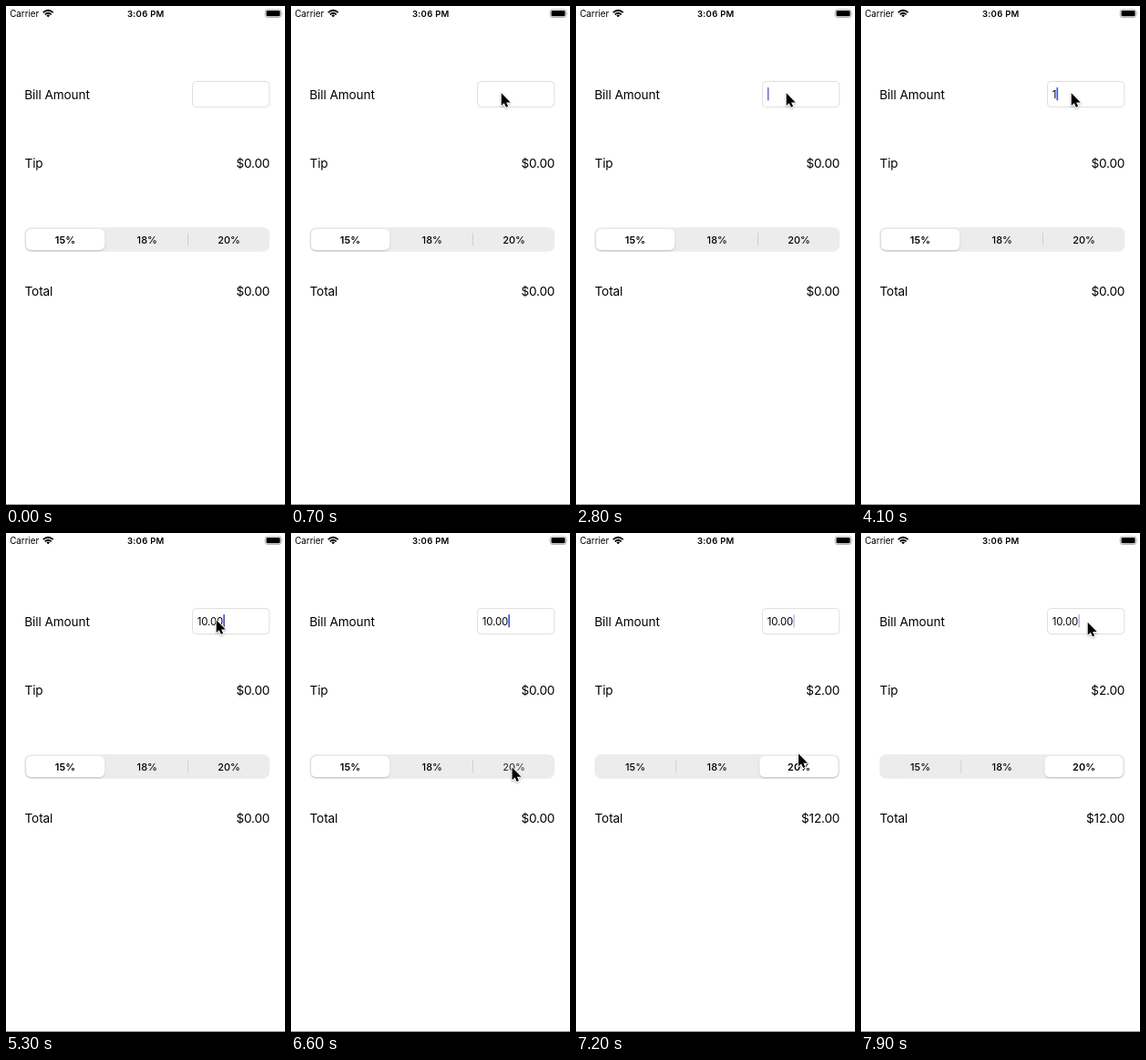
These frames come from a looping animation (306 px wide and 546 px high, 8000 ms). An HTML page:

```html
<!DOCTYPE html>
<html lang="en">
<head>
<meta charset="utf-8">
<title>Tip calculator</title>
<style>
  html, body { margin: 0; width: 100%; height: 100%; overflow: hidden; background: #fff; }
  svg { display: block; width: 100%; height: 100%; font-family: Inter, Roboto, sans-serif; }
  .label { font-size: 13.6px; letter-spacing: -.1px; }
  .money { font-size: 13.6px; letter-spacing: -.18px; text-anchor: end; }
  .status { font-size: 9.8px; }
  .clock { font-size: 9.5px; font-weight: 600; letter-spacing: .26px; text-anchor: middle; }
  .segment { font-size: 10.9px; font-weight: 500; letter-spacing: .06px; text-anchor: middle; }
</style>
</head>
<body>
<svg viewBox="0 0 306 546" xmlns="http://www.w3.org/2000/svg">
  <defs>
    <filter id="thumbShadow" x="-10%" y="-30%" width="120%" height="170%">
      <feDropShadow dx="0" dy="1" stdDeviation="1.2" flood-opacity=".2"/>
    </filter>
    <filter id="arrowShadow" x="-50%" y="-30%" width="200%" height="180%">
      <feDropShadow dx="0" dy="1" stdDeviation=".9" flood-opacity=".35"/>
    </filter>
  </defs>
  <rect width="306" height="546" fill="#fff"/>

  <text class="status" x="4.2" y="12">Carrier</text>
  <text class="clock" x="153.3" y="11.9">3:06 PM</text>
  <g fill="none" stroke="#000" stroke-width="1.7">
    <path d="M40.7 7.2Q46.2 2.3 51.7 7.2"/>
    <path d="M42.7 9.3Q46.2 6.2 49.7 9.3"/>
    <path d="M44.3 10.4Q46.2 8.8 48.1 10.4L46.2 12.3Z" fill="#000" stroke="none"/>
  </g>
  <rect x="284.2" y="3.9" width="17.6" height="8.6" rx="2.4" fill="none" stroke="#a0a0a0" stroke-width=".8"/>
  <rect x="285.5" y="5.1" width="15.1" height="6.2" rx="1.3"/>
  <path d="M302.7 6.8Q304.2 8.2 302.7 9.6Z" fill="#a0a0a0"/>

  <text class="label" x="20.3" y="102">Bill Amount</text>
  <text class="label" x="20.5" y="177">Tip</text>
  <text class="label" x="20.5" y="317">Total</text>
  <text class="money" id="tip" x="289.2" y="177"></text>
  <text class="money" id="total" x="289.2" y="317"></text>

  <rect x="204.5" y="82.5" width="84.3" height="28" rx="4" fill="#fff" stroke="#dfdfdf"/>
  <text id="amount" x="209.7" y="101" font-size="11.4" letter-spacing="-.1"></text>
  <rect id="caret" y="89" width="1.7" height="14.6" rx=".8" fill="#4359dc"/>

  <rect x="20.4" y="242.3" width="268.8" height="26.4" rx="7" fill="#ececec"/>
  <path id="dividerLeft" d="M109.8 248.5v14" stroke="#d0d0d2"/>
  <path id="dividerRight" d="M199.5 248.5v14" stroke="#d0d0d2"/>
  <rect id="thumb" y="244" width="86" height="23" rx="5.6" fill="#fff" filter="url(#thumbShadow)"/>
  <text id="first" class="segment" x="65" y="259.6">15%</text>
  <text class="segment" x="154.8" y="259.6">18%</text>
  <text id="last" class="segment" x="244.6" y="259.6">20%</text>

  <path d="M0 545.5H306" stroke="#999"/>
  <g id="pointer" filter="url(#arrowShadow)">
    <path d="M0 0V13.8L3.1 11L5.2 15.6L7.4 14.6L5.4 10.2H10Z" stroke="#fff" stroke-width="1.6" stroke-linejoin="round" paint-order="stroke"/>
  </g>
</svg>
<script>
const LOOP = 8000, STEP = 100;
const FOCUS = 1300, PRESS = 6500, RELEASE = 6800;
const BILL = 10, RATE = .2;
const keystrokes = [4100, 4300, 4800, 5200, 5300];

// Stops of the pointer: when it arrives, where, and how long the move takes.
const stops = [
  { t: 100, x: 213, y: 194, move: 0 },
  { t: 200, x: 241, y: 148, move: 100 },
  { t: 700, x: 230.7, y: 95.2, move: 300 },
  { t: 6400, x: 242.5, y: 256.5, move: 500 },
  { t: 7200, x: 244, y: 241.5, move: 200 },
  { t: 7400, x: 260, y: 165, move: 200 },
  { t: 7900, x: 248.7, y: 97.7, move: 500 }
];

const el = id => document.getElementById(id);
const set = (id, name, value) => el(id).setAttribute(name, value);
const ramp = (t, from, to) => Math.min(1, Math.max(0, (t - from) / (to - from)));
const ease = u => u * u * (3 - 2 * u);
const dollars = value => "$" + value.toFixed(2);

function pointerAt(t) {
  let { x, y } = stops[0];
  for (const stop of stops.slice(1)) {
    const u = ease(ramp(t, stop.t - stop.move, stop.t));
    x += (stop.x - x) * u;
    y += (stop.y - y) * u;
  }
  return [x, y];
}

function caretAt(t) {
  if (t < FOCUS) return 0;
  const typing = t >= keystrokes[0] && t < keystrokes.at(-1) + 600;
  const phase = (t - FOCUS) % 1000;
  return typing ? 1 : 1 - ramp(phase, 450, 700) + ramp(phase, 850, 1000);
}

function draw(time) {
  const t = Math.floor(time % LOOP / STEP) * STEP;

  set("pointer", "visibility", t < stops[0].t ? "hidden" : "visible");
  set("pointer", "transform", `translate(${pointerAt(t)})`);

  const typed = keystrokes.filter(k => k <= t).length;
  const amount = el("amount");
  amount.textContent = BILL.toFixed(2).slice(0, typed);
  set("caret", "x", 209.9 + amount.getComputedTextLength());
  set("caret", "opacity", caretAt(t));

  const slide = ease(ramp(t, RELEASE - 100, RELEASE + 300));
  set("thumb", "x", 22.1 + 179.3 * slide);
  set("dividerRight", "opacity", 1 - slide);
  set("dividerLeft", "opacity", slide);
  el("first").style.fontWeight = slide < .5 ? 600 : 500;
  el("last").style.fontWeight = slide < .5 ? 500 : 600;

  const press = ramp(t, PRESS, PRESS + 200) - ramp(t, RELEASE - 100, RELEASE + 100);
  set("last", "opacity", 1 - .5 * press);

  const tip = t >= RELEASE ? BILL * RATE : 0;
  el("tip").textContent = dollars(tip);
  el("total").textContent = dollars(tip && BILL + tip);
}

const start = performance.now();
function tick() {
  draw(performance.now() - start);
  requestAnimationFrame(tick);
}
tick();
</script>
</body>
</html>
```
